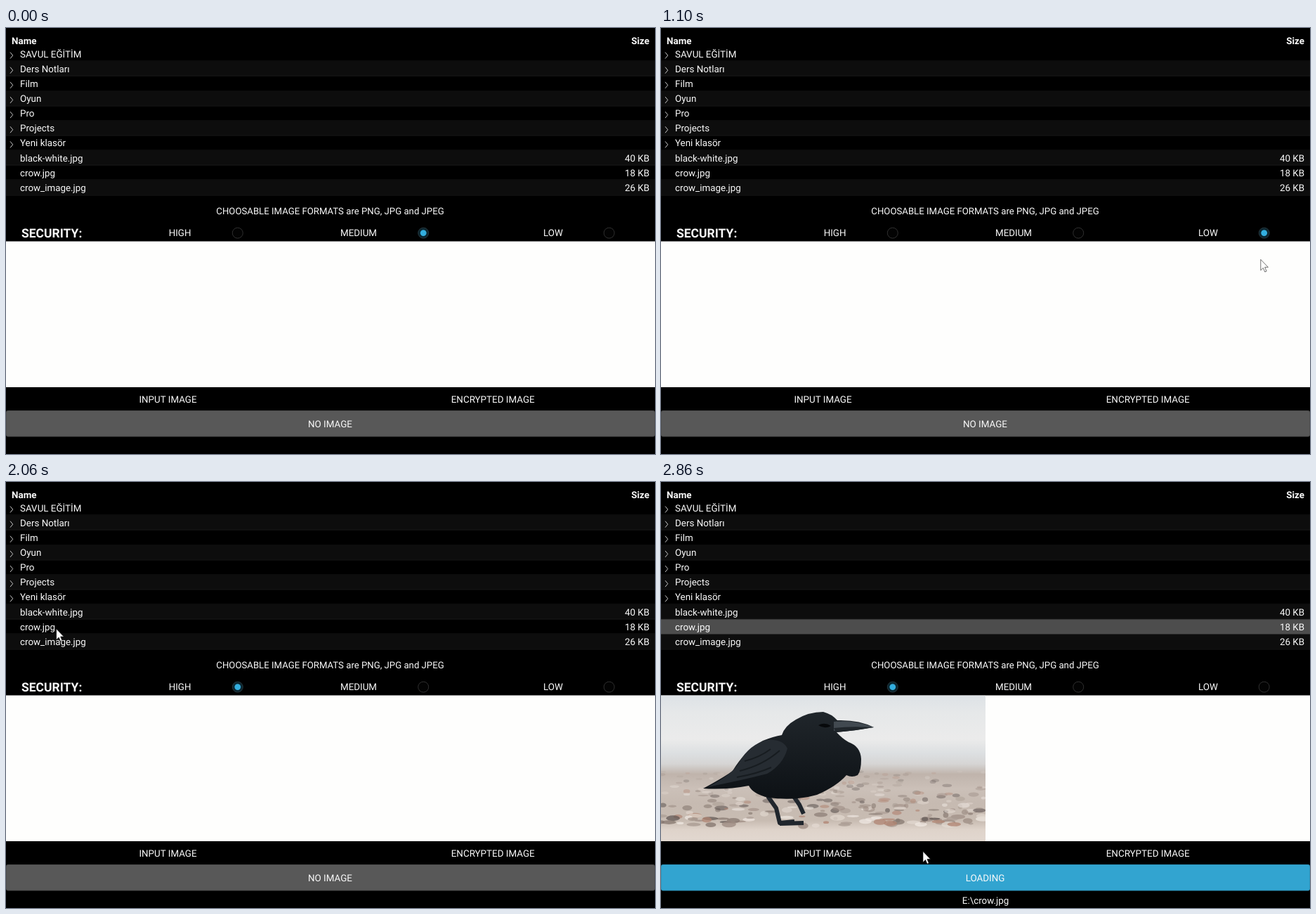
Write an HTML page that moves like this. It is 924 by 606 pixels and loops after 8000 ms.

```html
<!DOCTYPE html>
<html lang="tr">
<head>
<meta charset="utf-8">
<title>Image encryption</title>
<style>
  html, body { margin: 0; width: 100%; height: 100%; overflow: hidden; background: #000; }
  svg { display: block; width: 100vw; height: 100vh; }
  text { font: 13.4px Roboto, sans-serif; fill: #fafafa; text-rendering: geometricPrecision; }
  .bold { font-weight: 700; }
  .large { font-size: 17.5px; }
  .hint { font-size: 13.2px; }
  .mid { text-anchor: middle; }
  .end { text-anchor: end; }
</style>
</head>
<body>
<svg viewBox="0 0 924 606">
  <defs>
    <linearGradient id="shore" x2="0" y2="1">
      <stop offset="0" stop-color="#dde2e6"/>
      <stop offset=".12" stop-color="#e6e8e9"/>
      <stop offset=".3" stop-color="#ebebeb"/>
      <stop offset=".4" stop-color="#dcdfe1"/>
      <stop offset=".47" stop-color="#d6d5d4"/>
      <stop offset=".54" stop-color="#c0b4ac"/>
      <stop offset=".64" stop-color="#cbc0b8"/>
      <stop offset=".74" stop-color="#c6bab1"/>
      <stop offset=".86" stop-color="#c8bcb2"/>
      <stop offset=".92" stop-color="#ded3ca"/>
      <stop offset="1" stop-color="#e2d8d0"/>
    </linearGradient>
    <linearGradient id="feathers" x2="0" y2="1">
      <stop offset="0" stop-color="#20262b"/>
      <stop offset="1" stop-color="#0d1115"/>
    </linearGradient>
    <clipPath id="frame"><rect y="303.5" width="462" height="207.5"/></clipPath>
    <filter id="soft"><feGaussianBlur stdDeviation=".6"/></filter>
  </defs>

  <g id="list"></g>
  <rect y="303.5" width="924" height="207.5" fill="#fefefd"/>

  <g id="photo" clip-path="url(#frame)">
    <rect y="303.5" width="462" height="207.5" fill="url(#shore)"/>
    <g id="pebbles" filter="url(#soft)"></g>
    <g filter="url(#soft)">
      <path d="M152 447L164 464L169 485L190 483M169 486L203 485M188 446L197 459L203 472"
        fill="none" stroke="#20262d" stroke-width="6" stroke-linejoin="round"/>
      <path d="M60 436Q88 421 102 411Q119 382 145 368Q160 362 172 360Q176 347 192 338Q210 327 231 327Q243 330 251 339
        Q282 338 303 349Q276 354 250 356Q258 365 267 370Q284 376 285 394Q285 411 280 417Q272 421 264 417
        Q250 433 222 445Q190 454 153 449Q131 444 125 432Q94 438 60 436Z" fill="url(#feathers)"/>
      <path d="M66 434Q101 417 111 399Q126 373 151 367Q173 365 180 379Q174 402 151 415Q116 424 66 434Z" fill="#262c32"/>
      <path d="M112 411Q145 403 169 382M108 420Q137 415 157 406M119 397Q140 392 156 380" fill="none" stroke="#171c20" stroke-width="2"/>
      <path d="M246 341Q275 338 303 349Q276 352 246 354Z" fill="#414950"/>
      <path d="M246 350Q270 347 301 349Q276 354 249 356Z" fill="#20262b"/>
      <path d="M224 346Q233 341 242 347Q233 352 224 346Z" fill="#07090b"/>
    </g>
  </g>

  <text class="mid" x="230.5" y="533">INPUT IMAGE</text>
  <text class="mid" x="693.2" y="533">ENCRYPTED IMAGE</text>
  <rect id="button" x=".5" y="544.5" width="923" height="36.5" rx="2"/>
  <text id="label" class="mid" x="461.5" y="568.3"></text>
  <text id="path" class="mid" x="462" y="600">E:\crow.jpg</text>
  <path id="cursor" d="M0 0V15.4L3.5 12L6 17.7L8.3 16.7L5.9 11H10.6Z" fill="#fff" stroke="#111" stroke-width=".6"/>
</svg>
<script>
const $ = id => document.getElementById(id);

function add(parent, tag, attrs, content = "") {
  const el = document.createElementNS("http://www.w3.org/2000/svg", tag);
  for (const name in attrs) el.setAttribute(name, attrs[name]);
  el.textContent = content;
  return parent.appendChild(el);
}
const write = (content, x, y, style = "") => add($("list"), "text", { x, y, class: style }, content);
const band = (y, height, fill) => add($("list"), "rect", { y, width: 924, height, fill });

// File list
const files = [
  ["SAVUL EĞİTİM"], ["Ders Notları"], ["Film"], ["Oyun"], ["Pro"], ["Projects"], ["Yeni klasör"],
  ["black-white.jpg", "40 KB"], ["crow.jpg", "18 KB"], ["crow_image.jpg", "26 KB"]
];
const rowHeight = 21.14;
const rowTop = i => 26.2 + i * rowHeight;
files.forEach((_, i) => {
  if (i % 2) band(rowTop(i), rowHeight, "#0d0d0d");
  band(Math.round(rowTop(i + 1)) - .5, 1, "#191919");
});
const selection = band(rowTop(8), rowHeight, "#4d4d4d");
files.forEach(([name, size], i) => {
  const top = rowTop(i);
  write(name, 20, top + 15.4);
  if (size) write(size, 916, top + 15.4, "end");
  else add($("list"), "path", { d: `M6 ${top + 8.3}L9.7 ${top + 12.8}L6 ${top + 17.3}`, fill: "none", stroke: "#c8c8c8" });
});
write("Name", 8, 23.3, "bold");
write("Size", 916, 23.3, "bold end");
write("CHOOSABLE IMAGE FORMATS are PNG, JPG and JPEG", 461.5, 265, "hint mid");
write("SECURITY:", 22, 298, "bold large");

// Security levels
const radios = [["HIGH", 247.6, 329.8], ["MEDIUM", 502, 594.2], ["LOW", 779, 858.7]].map(([name, x, cx]) => {
  write(name, x, 296.2, "mid");
  const ring = add($("list"), "circle", { cx, cy: 291.6, r: 7.5 });
  const dot = add($("list"), "circle", { cx, cy: 291.6, r: 4.4, fill: "#33aede" });
  return { ring, dot };
});

// Pebbles on the beach
let seed = 7;
const random = () => (seed = seed * 16807 % 2147483647) / 2147483647;
const tones = ["#85776f", "#a99b92", "#efe8e2", "#5d5350", "#b08472", "#e2d8d0", "#9c8b82"];
for (let i = 0; i < 260; i++) {
  const depth = random();
  add($("pebbles"), "ellipse", {
    cx: random() * 462, cy: 412 + depth * 78,
    rx: 3 + random() * (3 + depth * 6), ry: 1.2 + random() * (1 + depth * 2.5),
    fill: tones[Math.floor(random() * tones.length)], opacity: .15 + depth * .65
  });
}

// Pointer track: time, x, y
const track = [
  [440, 640, 325], [680, 738, 283.5], [880, 858, 287], [980, 858, 288], [1170, 852, 347], [1270, 852, 347],
  [1480, 343, 291.5], [1560, 334, 288], [1660, 334, 288], [2060, 71.7, 209], [2200, 71.7, 209],
  [2650, 457.5, 559], [2720, 457.5, 559], [2860, 373, 525.5]
];
function pointerAt(t) {
  const next = track.findIndex(key => key[0] > t);
  if (next < 1) return track[next < 0 ? track.length - 1 : 0].slice(1);
  const [t0, x0, y0] = track[next - 1], [t1, x1, y1] = track[next];
  const p = (t - t0) / (t1 - t0), e = p * p * (3 - 2 * p);
  return [x0 + (x1 - x0) * e, y0 + (y1 - y0) * e];
}

const show = (el, visible) => el.setAttribute("visibility", visible ? "visible" : "hidden");

function draw(now) {
  const t = now % 8000;
  const level = t < 920 ? 1 : t < 1600 ? 2 : 0;
  const chosen = t >= 2200, loading = t >= 2720;

  radios.forEach(({ ring, dot }, i) => {
    const on = i === level;
    ring.setAttribute("fill", on ? "#0b2630" : "#030303");
    ring.setAttribute("stroke", on ? "#26353b" : "#303030");
    show(dot, on);
  });
  for (const el of [selection, $("photo"), $("path")]) show(el, chosen);
  $("button").setAttribute("fill", loading ? "#32a4d0" : "#585858");
  $("button").setAttribute("stroke", loading ? "#2d94bc" : "#4b4b4b");
  $("label").textContent = loading ? "LOADING" : chosen ? "ENCRYPT" : "NO IMAGE";
  show($("cursor"), t >= 440);
  $("cursor").setAttribute("transform", `translate(${pointerAt(t)})`);
  requestAnimationFrame(draw);
}
draw(performance.now());
</script>
</body>
</html>
```
